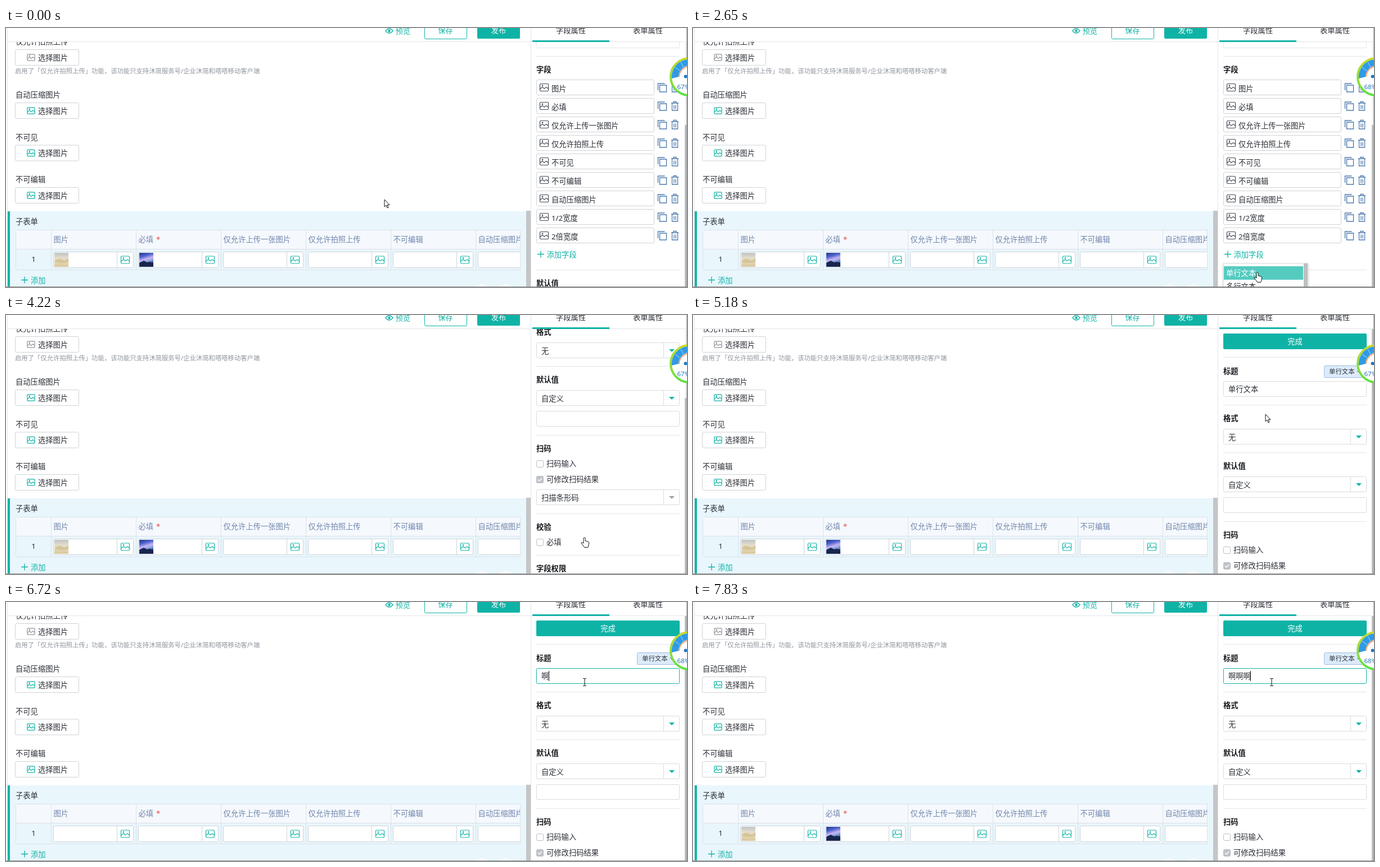
Write an HTML page that moves like this. It is 1211 by 462 pixels and loops after 8000 ms.

```html
<!DOCTYPE html>
<html lang="zh-CN">
<head>
<meta charset="utf-8">
<style>
html, body { margin: 0; width: 100%; height: 100%; overflow: hidden; background: #fff; }
svg { display: block; width: 1211px; height: 462px; }
text { font: 13.3px "Noto Sans", "Noto Sans CJK SC", "Noto Sans CJK", "Noto Sans CJK JP", sans-serif; white-space: pre; }
text.bold { font-weight: 700; }
</style>
</head>
<body>
<svg id="stage" viewBox="0 0 1211 462"></svg>
<script>
const TEAL = '#0fb3a6', INK = '#2b2f36', BLUE = '#4f7cae', LINE = '#e3e5e8', BORDER = '#cfd2d6', HEAD = '#7185ad';

// Drawing helpers: each returns SVG markup; text is placed by its vertical centre.
const rect = (x, y, w, h, fill, extra = '') => `<rect x="${x}" y="${y}" width="${w}" height="${h}" fill="${fill}" ${extra}/>`;
const box = (x, y, w, h, stroke = BORDER, fill = '#fff', r = 2) =>
  rect(x + .5, y + .5, w - 1, h - 1, fill, `stroke="${stroke}" rx="${r}"`);
const path = (d, stroke, extra = '') => `<path d="${d}" fill="none" stroke="${stroke}" ${extra}/>`;
const text = (x, cy, s, fill = INK, size = 13.3, extra = '') =>
  `<text x="${x}" y="${Math.round(cy + size * .37)}" fill="${fill}" style="font-size:${size}px" ${extra}>${s}</text>`;
const mid = 'text-anchor="middle"';
const title = (cy, s) => text(943, cy, s, '#15181c', 13.3, 'class="bold"');
const rule = y => rect(943, y, 255, 1, LINE);
const group = (id, body, extra = '') => `<g id="${id}" ${extra}>${body}</g>`;
const picture = (cx, cy, color, k = 1) =>
  `<g transform="translate(${cx} ${cy}) scale(${k})" fill="none" stroke="${color}" stroke-width="${1.2 / k}">
    <rect x="-7.5" y="-6.5" width="15" height="13" rx="1.5"/><path d="M-7 2.5L-3.2 -.8L.3 2.2L3.6 -.6L7 2"/><circle cx="-3" cy="-3.2" r=".8"/></g>`;
const plus = (x, cy) => path(`M${x} ${cy}h12m-6 -6v12`, TEAL, 'stroke-width="1.3"');

function uploadButton(y, iconColor) {
  return box(16, y, 114, 29) + picture(44.5, y + 14.5, iconColor, .88) + text(57, y + 15, '选择图片');
}

function formArea() {
  const labels = [[24, '仅允许拍照上传'], [119, '自动压缩图片'], [195, '不可见'], [270, '不可编辑']];
  return labels.map(([y, s]) => text(17, y, s)).join('') +
    [38, 133, 208.5, 284].map((y, i) => uploadButton(y, i ? TEAL : '#8d9299')).join('') +
    text(16, 77, '启用了「仅允许拍照上传」功能，该功能只支持沐简服务号/企业沐简和嗒嗒移动客户端', '#8f959d', 11.35);
}

function subform() {
  const names = ['图片', '必填', '仅允许上传一张图片', '仅允许拍照上传', '不可编辑', '自动压缩图片'];
  const columns = names.map((name, i) => {
    const x = 80 + 151 * i;
    return rect(x, 360, 1, 72, '#dbe2e8') + text(x + 4.5, 377, name, HEAD) +
      box(x + 4, 399, 143, 29, '#cdd5db') + rect(x + 117, 400, 1, 27, '#cdd5db') + picture(x + 132, 413.5, TEAL);
  }).join('');
  const thumbs =
    rect(86, 401, 25, 25, 'url(#sand)') + '<path d="M86 417q7 -8 13 -4t12 -2v6q-12 4 -25 0z" fill="#c9b684" opacity=".6"/>' +
    rect(237, 401, 25, 25, 'url(#dusk)') + '<path d="M237 419l8 -4 6 3 5 -1 6 2v7h-25z" fill="#18264f"/>';
  return rect(3, 327, 922, 135, '#e9f6fc') + rect(3, 327, 4, 135, TEAL) + text(17, 345, '子表单') +
    '<g clip-path="url(#tableClip)">' + box(17, 360, 960, 72, '#dbe2e8', '#e9f6fc', 3) +
    rect(18, 361, 900, 33, '#f5f9fd') + rect(17, 394, 900, 1, '#dbe2e8') +
    columns + group('thumbs', thumbs) + '</g>' + rect(914, 360, 1, 72, '#dbe2e8') +
    text(267, 377, '*', '#e8483f') + text(49, 412.5, '1', INK, 13.3, mid) +
    plus(27, 449.5) + text(44, 450, '添加', TEAL) +
    '<circle cx="846" cy="473" r="16" fill="#fff"/><circle cx="889" cy="473" r="16" fill="#fff"/>' +
    rect(925, 326, 8, 136, '#c3c5c6');
}

function fieldRow(name, i) {
  const y = 92 + 33 * i;
  return box(943, y, 210, 28) + picture(957, y + 14, '#444a55') + text(970, y + 15.7, name) +
    path(`M1171.5 ${y + 7}h-12v12M1162.5 ${y + 10}h12v12h-12z`, BLUE, 'stroke-width="1.4"') +
    path(`M1183 ${y + 9}h13m-9 0v-2.5h5v2.5M1184.5 ${y + 9.5}v12.5h10v-12.5m-6.5 3v7m3 -7v7`, BLUE, 'stroke-width="1.3"');
}

function listPanel() {
  const names = ['图片', '必填', '仅允许上传一张图片', '仅允许拍照上传', '不可见', '不可编辑', '自动压缩图片', '1/2宽度', '2倍宽度'];
  return box(943, 5, 255, 31, LINE) + rule(50) + title(74, '字段') + names.map(fieldRow).join('') +
    group('newRow', fieldRow('单行文本', names.length)) +
    group('listFoot', plus(945, 403.5) + text(961.5, 404, '添加字段', TEAL) + rule(431) + title(455, '默认值'));
}

function dropdown() {
  return rect(943, 420, 151, 60, '#fff', 'stroke="#d5d8db" filter="url(#shadow)"') +
    rect(944, 425, 141, 24, '#55cbc0', 'id="optionBg"') +
    text(948, 437, '单行文本', '#fff', 13.3, 'id="option"') + text(948, 461, '多行文本') + rect(1086, 420, 7, 42, '#bdbfc1');
}

function select(y, value, arrow = TEAL) {
  return box(943, y, 255, 28, '#d8dbdf') + rect(1169, y, 1, 28, '#d8dbdf') + text(952, y + 15, value) +
    `<path d="M1179 ${y + 12}h10l-5 5z" fill="${arrow}"/>`;
}

function checkbox(cy, label, locked) {
  return box(943, cy - 6, 13, 13, '#b9bdc3', locked ? '#bfc3c8' : '#fff') +
    (locked ? path(`M946 ${cy + .5}l2.5 2.5 4.5 -5`, '#fff', 'stroke-width="1.5"') : '') + text(961, cy, label);
}

function editPanel() {
  return rect(943, 33, 255, 28, TEAL, 'rx="2"') + text(1070.5, 47, '完成', '#fff', 13.3, mid) + rule(75) +
    title(100, '标题') + box(1122, 90, 72, 22, '#9dbce0', '#dcebfb') + text(1131, 101, '单行文本', INK, 11.4) +
    path('M1181 99.5l3 3 3 -3', '#444') +
    rect(943.5, 118.5, 254, 27, '#fff', 'id="titleBox" rx="2"') + rect(951, 123, 53, 19, '#a5daf0', 'id="selection"') +
    '<text id="titleText" x="952" y="137"><tspan id="typed"></tspan><tspan id="composing" text-decoration="underline"></tspan></text>' +
    rect(0, 123, 1, 18, '#111', 'id="caret"') +
    rule(160) + title(184, '格式') + select(203, '无') + rule(245) +
    title(269, '默认值') + select(288, '自定义') + box(943, 325, 255, 28, '#d8dbdf') + rule(368) +
    title(392.5, '扫码') + checkbox(419, '扫码输入') + checkbox(447, '可修改扫码结果', true) +
    select(465, '扫描条形码', '#9aa0a8') + rule(508) +
    title(532.5, '校验') + checkbox(559, '必填') + rule(582) + title(606.5, '字段权限');
}

function header() {
  return rect(0, 0, 1211, 24, '#fff') + rect(2, 24, 1206, 1, LINE) +
    path('M675 5q6.5 -8 13 0q-6.5 8 -13 0z', TEAL, 'stroke-width="1.4"') + `<circle cx="681.5" cy="5" r="2.3" fill="${TEAL}"/>` +
    text(692.5, 5, '预览', TEAL) + box(744, -9, 76, 29, TEAL) + text(781.5, 4.5, '保存', TEAL, 13.3, mid) +
    rect(838, -10, 76, 29, TEAL, 'rx="2"') + text(876, 4.5, '发布', '#fff', 13.3, mid) +
    text(1004.5, 4.5, '字段属性', INK, 13.3, mid) + text(1141.5, 4.5, '表单属性', INK, 13.3, mid) + rect(936, 22, 137, 3, TEAL);
}

function gauge() {
  return '<circle cx="1215" cy="87" r="33" fill="#fff" stroke="url(#ring)" stroke-width="4"/>' +
    '<path d="M1184 90A31 31 0 0 1 1215 56V67A20 20 0 0 0 1196 87Z" fill="#2f9ae6"/>' +
    path('M1190 70l8 6M1200 61l5 9', '#7cc6f5', 'stroke-width="1.5"') +
    path('M1197 87A19 19 0 0 1 1211 69', '#f0a070', 'stroke-width="2"') +
    '<circle cx="1208.5" cy="86.5" r="3" fill="#1d78c8"/>' + text(1193.5, 105, '67%', '#2a74b8', 11.5, 'id="percent"');
}

function candidates() {
  const items = [...'啊吖阿嗄锕呵腌'].map((c, i) => {
    const x = 783 + 57.2 * i;
    return text(x, 166, i + 1, i ? '#777' : '#fff', 11) + text(x + 10, 165, c, i ? '#111' : '#fff', 17);
  }).join('');
  return rect(766.5, 143.5, 444, 41, '#fff', 'stroke="#1c7cd5"') + rect(767, 144, 58, 41, '#0078d7') + items +
    rect(1169, 144, 1, 41, '#1c7cd5') + '<circle cx="1189.5" cy="164" r="7.7" fill="none" stroke="#222" stroke-width="1.3"/>' +
    '<circle cx="1186.7" cy="162" r="1.1"/><circle cx="1192.3" cy="162" r="1.1"/>' + path('M1185.5 166q4 4.5 8 0', '#222', 'stroke-width="1.3"');
}

const pointers =
  group('arrow', '<path d="M0 0V12.8L3 10.2L5 15L7 14.2L5 9.6H9Z" fill="#fff" stroke="#111"/>') +
  group('hand', '<path d="M-1 10V1.5a1.6 1.6 0 0 1 3.2 0V6l4.5 1q2.3 .6 2 3l-.8 4q-.3 2 -1.2 3.5H.5Q-1.5 14 -5 10.2q0 -2 2 -1.2Z" fill="#fff" stroke="#111"/>') +
  group('beam', path('M-3 -6.5h2.2L0 -6L.8 -6.5H3M0 -6V6M-3 6.5h2.2L0 6L.8 6.5H3', '#111'));

const stops = list => list.map(([o, c]) => `<stop offset="${o}" stop-color="${c}"/>`).join('');
document.getElementById('stage').innerHTML = `<defs>
  <clipPath id="tableClip"><rect x="17" y="359" width="898" height="75"/></clipPath>
  <linearGradient id="sand" x2="0" y2="1">${stops([[0, '#bfc3c4'], [.35, '#e2dccb'], [.6, '#e6dab8'], [1, '#d8c79c']])}</linearGradient>
  <linearGradient id="dusk" x2=".3" y2="1">${stops([[0, '#26357f'], [.3, '#4a62d0'], [.55, '#c9b4f2'], [.7, '#8fa6e6'], [1, '#27356f']])}</linearGradient>
  <linearGradient id="ring" x2="0" y2="1">${stops([[0, '#c9d92c'], [1, '#5fe046']])}</linearGradient>
  <filter id="shadow"><feDropShadow dx="0" dy="1" stdDeviation="1.5" flood-opacity=".2"/></filter></defs>` +
  rect(0, 0, 1211, 462, '#fff') + formArea() + subform() +
  rect(933, 0, 278, 462, '#fff') + group('list', listPanel()) + group('edit', editPanel()) +
  rect(1207, 0, 4, 462, '#f4f5f6') + rect(1207, 0, 4, 500, '#b9bbbd', 'id="scrollThumb"') +
  header() + rect(2, 0, 1, 462, LINE) + rect(933, 0, 1, 462, LINE) + rect(1210, 0, 1, 462, '#9b9ea2') +
  group('menu', dropdown()) + gauge() + group('ime', candidates()) + rect(0, 461, 1211, 1, '#8e9296') + group('pointer', pointers);

const ui = {};
document.querySelectorAll('[id]').forEach(el => ui[el.id] = el);
const show = (el, on) => el.setAttribute('display', on ? 'inline' : 'none');
const within = (t, spans) => spans.some(([a, b]) => t >= a && t < b);
const latest = (t, list) => list.filter(item => item[0] <= t).pop();

// Fraction of a motion that lands in `count` equal jumps, the first at `start`, the last at `end`.
function jumps(t, start, end, count) {
  if (t < start) return 0;
  return Math.min(count, Math.floor((t - start) / (end - start) * (count - 1) + 1e-6) + 1) / count;
}

const moves = [
  [430, 1200, 14, [[673, 306], [330, 268], [24, 418], [420, 426], [911, 412]]],
  [1260, 1630, 9, [[921, 410], [991, 403]]],
  [2440, 2650, 5, [[991, 403], [1003, 436]]],
  [3140, 3520, 7, [[1003, 436], [1018, 406]]],
  [3730, 3850, 3, [[1018, 406], [1028, 397]]],
  [4910, 5270, 8, [[1028, 397], [1015, 103]]],
  [5450, 5630, 4, [[1015, 103], [1029, 143]]],
];

function pointerAt(t) {
  if (t >= 1200 && t < 1300) return [921, 410];
  const [start, end, count, points] = latest(t, moves) || moves[0];
  const p = jumps(t, start, end, count) * (points.length - 1);
  const i = Math.min(Math.floor(p), points.length - 2), f = p - i;
  return [0, 1].map(k => Math.round(points[i][k] + (points[i + 1][k] - points[i][k]) * f));
}

const shapes = [[0, 'arrow'], [1870, 'hand'], [4280, 'arrow'], [5510, 'beam']];
const typing = [[0, '单行文本', ''], [6330, '', 'a'], [6720, '啊', ''], [7240, '啊', 'a'],
  [7470, '啊啊', ''], [7530, '啊啊', 'a'], [7770, '啊啊啊', '']];
const reloads = [[3200, 3460], [6330, 6480], [6720, 6860], [7300, 7420], [7530, 7600]];
const percents = [[0, 67], [1570, 68], [3850, 67], [5840, 68]];

function render(t) {
  ui.pointer.setAttribute('transform', `translate(${pointerAt(t)})`);
  const shape = latest(t, shapes)[1];
  ['arrow', 'hand', 'beam'].forEach(id => show(ui[id], id === shape));
  ui.percent.textContent = latest(t, percents)[1] + '%';
  show(ui.thumbs, !within(t, reloads));

  const editing = t >= 4220, added = t >= 3200;
  const scroll = Math.round(154 - 100 * jumps(t, 4330, 4710, 8) - 54 * jumps(t, 4910, 5100, 4));
  show(ui.list, !editing);
  show(ui.edit, editing);
  show(ui.newRow, added);
  ui.listFoot.setAttribute('transform', `translate(0 ${added ? 33 : 0})`);
  ui.edit.setAttribute('transform', `translate(0 ${-scroll})`);
  ui.scrollThumb.setAttribute('y', editing ? 25 + scroll * .8 : added ? 169 : 173);

  show(ui.menu, within(t, [[2050, 3140]]));
  const hovered = t >= 2550;
  show(ui.optionBg, hovered);
  ui.option.setAttribute('fill', hovered ? '#fff' : INK);

  const [, typed, composing] = latest(t, typing);
  const focused = t >= 5780, selected = within(t, [[5840, 6330]]);
  ui.titleBox.setAttribute('stroke', focused ? TEAL : '#d8dbdf');
  show(ui.selection, selected);
  ui.titleText.setAttribute('fill', selected ? '#fff' : INK);
  ui.typed.textContent = typed;
  ui.composing.textContent = composing;
  show(ui.caret, focused && !selected);
  if (focused) ui.caret.setAttribute('x', Math.round(952 + ui.titleText.getComputedTextLength() - .5));
  show(ui.ime, composing !== '');
}

const began = performance.now();
function tick() {
  render((performance.now() - began) % 8000);
  requestAnimationFrame(tick);
}
tick();
</script>
</body>
</html>
```
